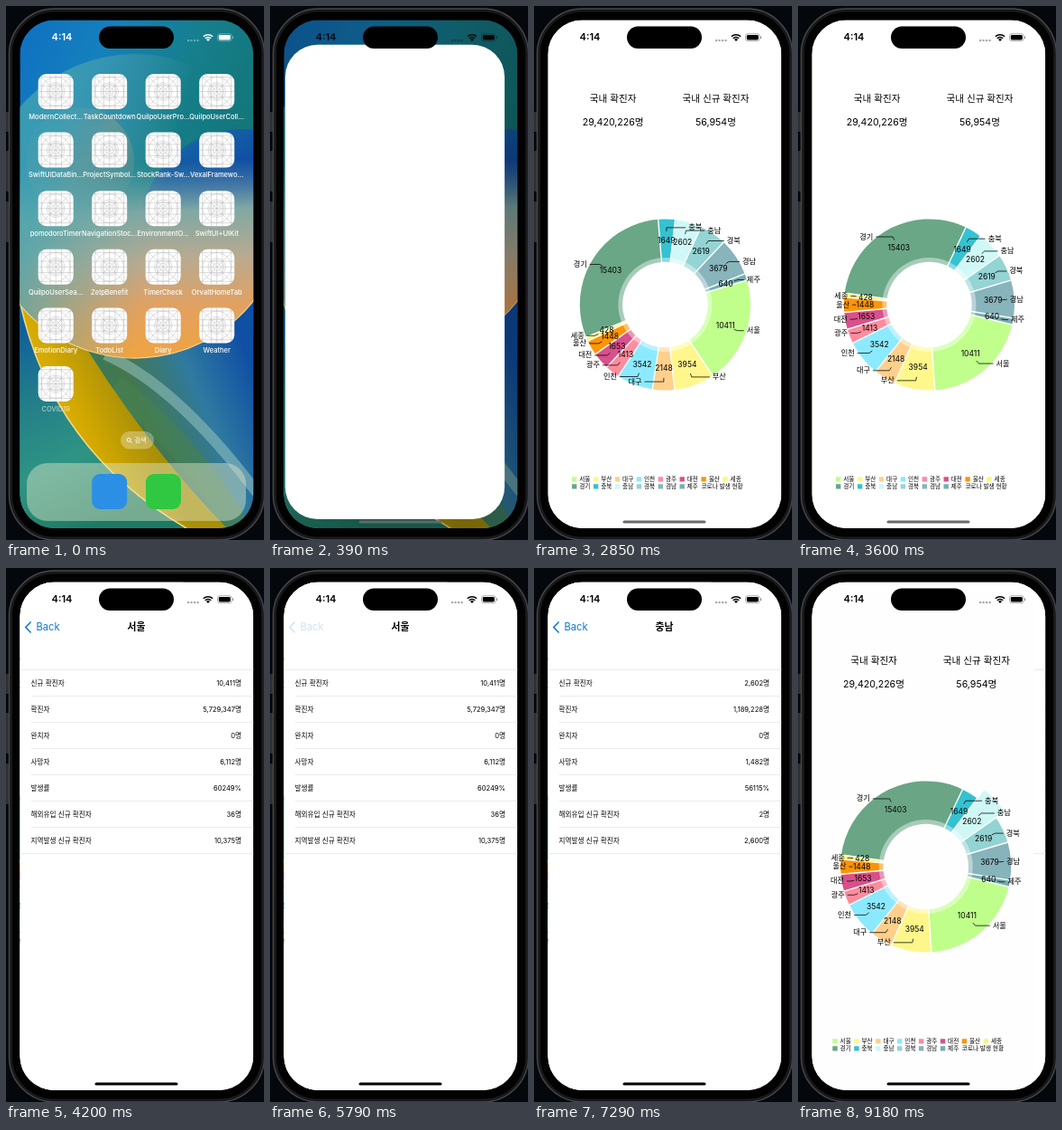
Animation, 286 px wide and 590 px high, one loop 9210 ms. Source, as an HTML page with a canvas:

```html
<!DOCTYPE html>
<html lang="ko">
<head>
<meta charset="utf-8">
<style>
  html, body { margin: 0; width: 100%; height: 100%; overflow: hidden; background: #04070b; }
  canvas { display: block; width: 286px; height: 590px; }
</style>
</head>
<body>
<canvas></canvas>
<script>
const LOOP = 9210, STEP = 30, TAU = Math.PI * 2;
const FONT = "Inter, 'Noto Sans CJK KR', 'Noto Sans CJK JP', 'Noto Sans CJK', sans-serif";
const SCREEN = { x: 15.4, y: 15.6, w: 258.8, h: 561.4, r: 38 };

const canvas = document.querySelector('canvas');
const ctx = canvas.getContext('2d');
const dpr = window.devicePixelRatio || 1;
canvas.width = 286 * dpr;
canvas.height = 590 * dpr;

const apps = ['ModernCollect…', 'TaskCountdown', 'QuilpoUserPro…', 'QuilpoUserColl…',
  'SwiftUIDataBin…', 'ProjectSymbol…', 'StockRank-Sw…', 'VexalFramewo…',
  'pomodoroTimer', 'NavigationStoc…', 'EnvironmentO…', 'SwiftUI+UIKit',
  'QuilpoUserSea…', 'ZelpBenefit', 'TimerCheck', 'OrvaltHomeTab',
  'EmotionDiary', 'TodoList', 'Diary', 'Weather', 'COVID19'];

const regions = [
  ['서울', 10411, '#c0ff8c'], ['부산', 3954, '#fff78c'], ['대구', 2148, '#ffd08c'],
  ['인천', 3542, '#8ceaff'], ['광주', 1413, '#ff8c9d'], ['대전', 1653, '#d9508a'],
  ['울산', 1448, '#fe9507'], ['세종', 428, '#fef778'], ['경기', 15403, '#6aa786'],
  ['충북', 1649, '#35c2d1'], ['충남', 2602, '#cff8f6'], ['경북', 2619, '#94d4d4'],
  ['경남', 3679, '#88b4bb'], ['제주', 640, '#76aeaf']];
const total = regions.reduce((sum, r) => sum + r[1], 0);

const rowNames = ['신규 확진자', '확진자', '완치자', '사망자', '발생률', '해외유입 신규 확진자', '지역발생 신규 확진자'];
const details = {
  서울: ['10,411명', '5,729,347명', '0명', '6,112명', '60249%', '36명', '10,375명'],
  충남: ['2,602명', '1,189,228명', '0명', '1,482명', '56115%', '2명', '2,600명'],
};

// --- helpers ---
const clamp = v => Math.max(0, Math.min(1, v));
const mix = (a, b, p) => a + (b - a) * p;
const ramp = (t, from, to) => clamp((t - from) / (to - from));

function spring(ms, speed) {
  if (ms <= 0) return 0;
  const k = ms / 1000 * speed;
  const p = 1 - (1 + k) * Math.exp(-k);
  return p > 0.995 ? 1 : p;
}

function text(str, x, y, size, { color = '#000', align = 'left', weight = 400 } = {}) {
  ctx.font = `${weight} ${size}px ${FONT}`;
  ctx.textAlign = align;
  ctx.textBaseline = 'middle';
  ctx.fillStyle = color;
  ctx.fillText(str, x, y);
}

function box(x, y, w, h, r, fill) {
  ctx.beginPath();
  ctx.roundRect(x, y, w, h, r);
  if (fill) { ctx.fillStyle = fill; ctx.fill(); }
}

function disc(x, y, r, fill) {
  ctx.beginPath();
  ctx.arc(x, y, r, 0, TAU);
  ctx.fillStyle = fill;
  ctx.fill();
}

function line(points, color, width) {
  ctx.beginPath();
  points.forEach(([x, y]) => ctx.lineTo(x, y));
  ctx.strokeStyle = color;
  ctx.lineWidth = width;
  ctx.stroke();
}

function strokePath(d, color, width) {
  ctx.strokeStyle = color;
  ctx.lineWidth = width;
  ctx.stroke(new Path2D(d));
}

function fillPath(d, fill) {
  ctx.fillStyle = fill;
  ctx.fill(new Path2D(d));
}

function fillScreen(fill) {
  ctx.fillStyle = fill;
  ctx.fillRect(SCREEN.x, SCREEN.y, SCREEN.w, SCREEN.h);
}

function gradient(x0, y0, x1, y1, ...colors) {
  const g = ctx.createLinearGradient(x0, y0, x1, y1);
  colors.forEach((c, i) => g.addColorStop(i / (colors.length - 1), c));
  return g;
}

function layer(alpha, paint) {
  if (alpha <= 0) return;
  ctx.save();
  ctx.globalAlpha *= alpha;
  paint();
  ctx.restore();
}

// --- phone ---
function drawPhone() {
  ctx.fillStyle = '#04070b';
  ctx.fillRect(0, 0, 286, 590);
  [[117, 22], [160, 45], [216, 45]].forEach(([y, h]) => box(0, y, 4, h, 1, '#2f3032'));
  box(3.5, 3, 283, 587, 50, '#19191b');
  ctx.strokeStyle = '#47484b';
  ctx.lineWidth = 1.4;
  ctx.stroke();
  box(7, 6.5, 276, 580, 46, '#020203');
}

function drawStatus(color) {
  text('4:14', 62, 35, 11, { color, align: 'center', weight: 600 });
  layer(0.35, () => { for (let i = 0; i < 4; i++) box(201 + i * 3.5, 37, 2.2, 2.2, 0.6, color); });
  ctx.strokeStyle = color;
  ctx.lineWidth = 1.5;
  [4.6, 7.3].forEach(r => {
    ctx.beginPath();
    ctx.arc(224, 39, r, -Math.PI * 0.75, -Math.PI * 0.25);
    ctx.stroke();
  });
  ctx.beginPath();
  ctx.moveTo(224, 39);
  ctx.arc(224, 39, 2.8, -Math.PI * 0.75, -Math.PI * 0.25);
  ctx.fillStyle = color;
  ctx.fill();
  layer(0.4, () => {
    box(234.5, 30.7, 15.6, 8, 2.4);
    ctx.lineWidth = 0.8;
    ctx.stroke();
    box(251, 33.2, 1.2, 3, 0.6, color);
  });
  box(235.8, 32, 13, 5.4, 1.4, color);
}

// --- home screen ---
function drawWallpaper() {
  // Sky, two soft balls
  fillScreen(gradient(15, 15, 275, 130, '#0f70c2', '#1480bd', '#167f8c', '#137678'));
  disc(262, 250, 114, gradient(200, 140, 275, 300, '#1668a6', '#0d3fa4', '#2a4f9c'));
  disc(82, 172, 60, gradient(30, 130, 140, 220, 'rgba(70,150,180,.3)', 'rgba(175,150,120,.5)', 'rgba(90,140,130,.3)'));
  // Ground: leaves and the yellow sweep
  fillPath('M15 300H275V577H15Z', gradient(90, 480, 275, 400, '#2d7d70', '#45774a', '#2f7aa0', '#0f4fa4'));
  strokePath('M110 385Q190 420 280 540', 'rgba(150,195,190,.55)', 12);
  strokePath('M120 420Q200 480 260 580', 'rgba(70,130,80,.6)', 26);
  fillPath('M15 325Q50 490 200 577H15Z', gradient(15, 360, 110, 570, '#11609c', '#237f88', '#2f9484', '#1d7a64'));
  fillPath('M15 325Q50 490 200 577H245Q150 480 75 355Z',
    gradient(30, 470, 130, 420, '#e8b818', '#d2a800', '#a88f08'));
  strokePath('M15 325Q50 490 200 577', '#f3dc82', 1.5);
  // Planet
  const planet = { x: 143, y: 221, r: 168 };
  disc(planet.x, planet.y, planet.r,
    gradient(140, 175, 150, 389, 'rgba(100,160,165,0)', '#7fa8a4', '#b9aa90', '#e2a160', '#f0a340'));
  disc(planet.x, planet.y, planet.r,
    gradient(15, 300, 150, 330, 'rgba(70,165,175,.75)', 'rgba(110,170,165,0)'));
  ctx.beginPath();
  ctx.arc(planet.x, planet.y, planet.r, Math.PI * 0.2, Math.PI * 0.8);
  ctx.strokeStyle = '#f6d08c';
  ctx.lineWidth = 1.2;
  ctx.stroke();
}

function drawIcon(x, y, size) {
  const c = size / 2;
  ctx.save();
  ctx.translate(x, y);
  box(0, 0, size, size, size * 0.23, '#fff');
  ctx.clip();
  ctx.strokeStyle = '#b9b9bb';
  ctx.lineWidth = 0.5;
  ctx.beginPath();
  [0.11, 0.2, 0.25, 0.41].forEach(k => {
    ctx.moveTo(c + size * k, c);
    ctx.arc(c, c, size * k, 0, TAU);
  });
  [0.09, 0.34, 0.5, 0.66, 0.91].forEach(k => {
    ctx.moveTo(size * k, 0); ctx.lineTo(size * k, size);
    ctx.moveTo(0, size * k); ctx.lineTo(size, size * k);
  });
  ctx.moveTo(0, 0); ctx.lineTo(size, size);
  ctx.moveTo(size, 0); ctx.lineTo(0, size);
  ctx.stroke();
  ctx.restore();
}

function drawHome(p) {
  drawWallpaper();
  ctx.save();
  ctx.translate(145, 296);
  ctx.scale(1 - 0.1 * p, 1 - 0.1 * p);
  ctx.translate(-145, -296);
  apps.forEach((name, i) => {
    const x = 35.7 + (i % 4) * 59.5, y = 75 + Math.floor(i / 4) * 64.6;
    const last = i === apps.length - 1;
    if (!last || p === 0) drawIcon(x, y, 39);
    layer(last ? 0.6 * (1 - p) : 1, () =>
      text(name, x + 19.5, y + 47.5, 7.5, { color: '#fff', align: 'center', weight: 500 }));
  });
  box(127, 470, 37, 19.5, 9.7, 'rgba(255,255,255,.3)');
  ctx.beginPath();
  ctx.arc(136.2, 479.3, 2, 0, TAU);
  ctx.strokeStyle = '#fff';
  ctx.lineWidth = 1;
  ctx.stroke();
  line([[137.7, 480.8], [139.6, 482.7]], '#fff', 1);
  text('검색', 142.5, 479.8, 7.2, { color: '#fff', weight: 500 });
  box(23, 505, 243, 64, 23, 'rgba(225,230,200,.45)');
  box(95.2, 517, 39, 39, 9, '#2b8fe6');
  box(155, 517, 39, 39, 9, '#2fc840');
  ctx.restore();
}

function drawLaunch(t) {
  const p = spring(t - 30, 12);
  drawHome(p);
  layer(p * 0.3, () => fillScreen('#000'));
  if (p > 0) {
    const x = mix(35.7, SCREEN.x, p), y = mix(398, SCREEN.y, p);
    const w = mix(39, SCREEN.w, p), h = mix(39, SCREEN.h, p);
    box(x, y, w, h, mix(9, SCREEN.r, p), '#fff');
    layer(1 - p * 2.5, () => drawIcon(x, y + (h - w) / 2, w));
  }
  const dark = ramp(p, 0.6, 0.95);
  layer(1 - dark, () => drawStatus('#fff'));
  layer(dark, () => { drawStatus('#000'); drawHomeBar('#6a6a6c'); });
}

// --- dashboard ---
function rotation(t) {
  if (t < 2340) return mix(270, 300, ramp(t, 1030, 1350));
  if (t < 2785) {
    const p = ramp(t, 2350, 2590);
    return mix(300, 334, p * p * (3 - 2 * p));
  }
  if (t < 2910) return mix(334, 352, ramp(t, 2785, 2910));
  return 373.8 - 21.8 * Math.exp(-(Math.min(t, 3660) - 2910) / 160);
}

function drawPie(angle, selected) {
  const cx = 145.4, cy = 330, radius = 94.6, hole = radius / 2, labelRadius = radius * 0.75;
  let start = angle * Math.PI / 180;
  const slices = regions.map(([name, value, color], i) => {
    const sweep = value / total * TAU;
    const slice = { name, value, color, start, end: start + sweep, mid: start + sweep / 2,
      r: radius + (i === selected ? 12 : 0) };
    start += sweep;
    return slice;
  });
  const at = (a, r) => [cx + Math.cos(a) * r, cy + Math.sin(a) * r];

  slices.forEach(s => {
    ctx.beginPath();
    ctx.moveTo(cx, cy);
    ctx.arc(cx, cy, s.r, s.start, s.end);
    ctx.fillStyle = s.color;
    ctx.fill();
  });
  slices.forEach(s => line([[cx, cy], at(s.start, 108)], '#fff', 1.4));
  disc(cx, cy, radius * 0.55, 'rgba(255,255,255,.41)');
  disc(cx, cy, hole, '#fff');

  slices.forEach(s => {
    const side = Math.cos(s.mid) < 0 ? -1 : 1;
    const [x, y] = at(s.mid, labelRadius * 1.2);
    const endX = x + side * labelRadius * 0.3 * Math.abs(Math.sin(s.mid));
    line([at(s.mid, 81), [x, y], [endX, y]], '#000', 0.75);
    text(s.name, endX + side * 3, y, 8.2, { align: side < 0 ? 'right' : 'left' });
    text(s.value, ...at(s.mid, labelRadius), 8.5, { align: 'center' });
  });
}

function drawLegend() {
  regions.forEach(([name, , color], i) => {
    const x = 42 + (i % 8) * 23.9, y = 523 + Math.floor(i / 8) * 8;
    box(x, y - 2.8, 5.4, 5.4, 0, color);
    text(name, x + 8.3, y, 6.6);
  });
  text('코로나 발생 현황', 185.5, 531, 6.6);
}

function drawDashboard(t) {
  fillScreen('#fff');
  if (t < 960) return;
  const center = { align: 'center' };
  text('국내 확진자', 87.7, 102.5, 10.6, center);
  text('29,420,226명', 87.7, 129, 10.6, center);
  text('국내 신규 확진자', 201.5, 102.5, 10.6, center);
  text('56,954명', 201.5, 129, 10.6, center);
  drawPie(rotation(t), t < 3780 ? -1 : t < 6570 ? 0 : 10);
  drawLegend();
}

// --- detail screen ---
function drawDetail(name, p, backAlpha) {
  const shift = (1 - p) * SCREEN.w;
  ctx.save();
  ctx.translate(shift, 0);
  fillScreen('#fff');
  for (let i = 0; i <= rowNames.length; i++) {
    const y = 112.5 + i * 29;
    const edge = i === 0 || i === rowNames.length;
    line([[edge ? 15 : 28, y], [275, y]], '#e6e6e8', 0.8);
  }
  rowNames.forEach((label, i) => {
    const y = 127.5 + i * 29;
    text(label, 27.6, y, 7.6);
    text(details[name][i], 261, y, 7.6, { align: 'right' });
  });
  ctx.restore();

  layer(p * p, () => text(name, 144.5 + shift * 0.5, 65.5, 10.8, { align: 'center', weight: 600 }));
  layer(p * p * backAlpha, () => {
    line([[27.6, 59.5], [21.8, 65.5], [27.6, 71.5]], '#0a7ad6', 1.6);
    text('Back', 33.4 + shift * 0.4, 65.5, 11.2, { color: '#0a7ad6' });
  });
}

function detailProgress(t) {
  const speed = 17.8;
  if (t < 5830) return spring(t - 3760, speed);
  if (t < 6820) return 1 - spring(t - 5830, speed);
  if (t < 8910) return spring(t - 6820, speed);
  return 1 - spring(t - 8910, speed);
}

function drawHomeBar(color) {
  box(98.5, 568.4, 92, 3.2, 1.6, color);
}

function drawApp(t) {
  const p = detailProgress(t);
  fillScreen('#fff');
  ctx.save();
  ctx.translate(-0.3 * SCREEN.w * p, 0);
  drawDashboard(t);
  ctx.restore();
  if (p > 0) {
    layer(0.1 * p, () => fillScreen('#000'));
    const leaving = (t >= 5790 && t < 6820) || t >= 8880;
    drawDetail(t < 6700 ? '서울' : '충남', p, leaving ? 0.2 : 1);
  }
  drawStatus('#000');
  drawHomeBar(t < 3780 ? '#6a6a6c' : '#000');
}

function draw(t) {
  ctx.setTransform(dpr, 0, 0, dpr, 0, 0);
  drawPhone();
  ctx.save();
  box(SCREEN.x, SCREEN.y, SCREEN.w, SCREEN.h, SCREEN.r);
  ctx.clip();
  if (t < 930) drawLaunch(t); else drawApp(t);
  box(103, 22.5, 83, 24.5, 12.2, '#000');
  ctx.restore();
}

const begin = performance.now();
function tick() {
  const t = (performance.now() - begin) % LOOP;
  draw(Math.floor(t / STEP) * STEP);
  requestAnimationFrame(tick);
}
tick();
</script>
</body>
</html>
```
